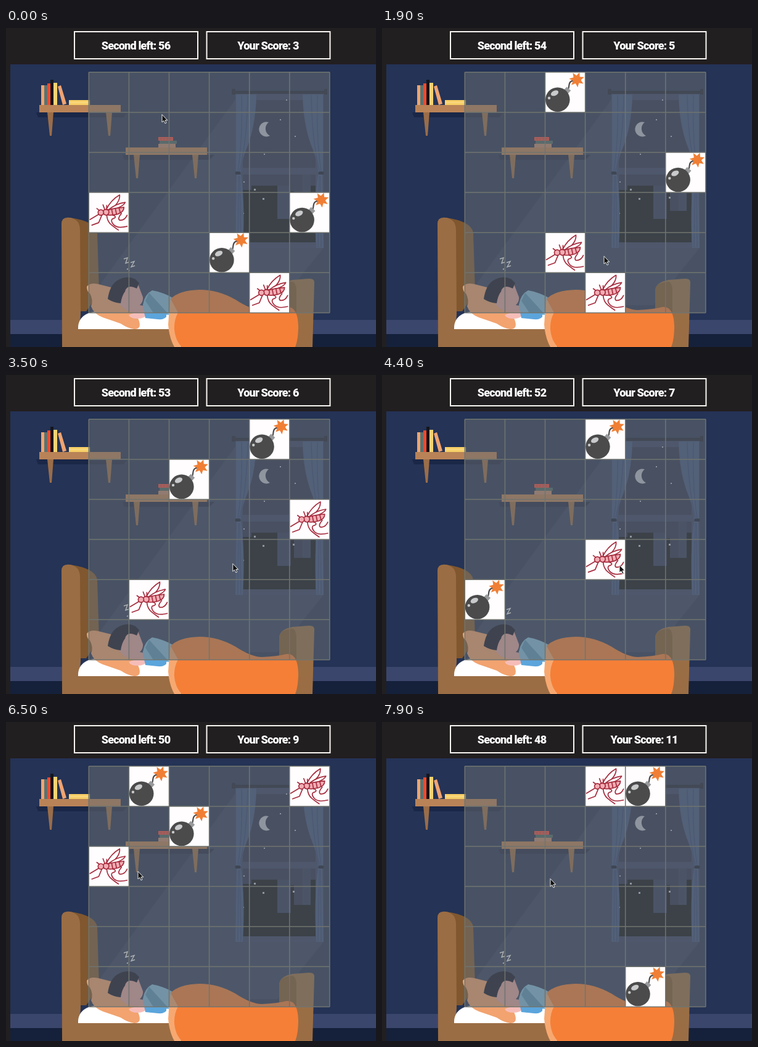
Animation of 600 by 518 pixels, one loop 8000 ms. Source, as an HTML page:

```html
<!DOCTYPE html>
<html lang="en">
<head>
<meta charset="utf-8">
<title>Mosquito game</title>
<style>
  html, body { margin: 0; width: 100%; height: 100%; overflow: hidden; background: #221f20; }
  svg { display: block; width: 100vw; height: 100vh; }
  text { font: 900 18px Roboto, sans-serif; letter-spacing: -.8px; fill: #fff; text-anchor: middle; }
</style>
</head>
<body>
<svg viewBox="0 0 600 518">
  <defs>
    <g id="mosquito">
      <rect width="65.1" height="65.1" fill="#fffdfe"/>
      <g fill="none" stroke="#a62c3e" stroke-width="1.7" stroke-linecap="round" stroke-linejoin="round">
        <path d="M17 35L2 44M21 37L16 49L5 53M29 37Q30 47 36 52T48 61M38 36Q48 40 38 43Q35 46 40 52Q46 59 62 55M53 34Q46 42 50 45Q58 46 62 37"/>
        <path d="M28 28Q36 12 50 4Q51 16 35 28Z" fill="#fff"/>
        <path d="M32 28Q44 18 59 16Q57 22 38 29Z" fill="#fff"/>
        <path d="M28 29Q42 25 57 24Q57 32 47 35Q36 38 28 36Z" fill="#f2adb4"/>
        <path d="M37 27L39 37M43 26L45 35.500M49 25L51 33"/>
        <path d="M23 30Q27 25 32 29Q34 35 29 37Q23 37 23 30Z" fill="#f2adb4"/>
        <circle cx="19.500" cy="32.500" r="4.500" fill="#f2adb4"/>
        <path d="M26 28L23 20M29 28L29 21M17 29L13 26"/>
      </g>
    </g>
    <g id="bomb">
      <rect width="65.1" height="65.1" fill="#fffdfe"/>
      <path d="M37 28C40 25 37 18 42 15S47 16 50 11" fill="none" stroke="#4b4b4d" stroke-width="2.2"/>
      <path d="M55.800 .5L56.200 7.500L63.300 7.900L58 12.800L62 18.800L54.900 17.500L52.800 24.400L49.300 18.100L42.500 20.700L45.400 14.100L39 10.500L46 8.500L45 1.300L50.800 5.500Z" fill="#f07f35"/>
      <rect x="-4.500" y="-5" width="9" height="10" fill="#98999b" transform="translate(35 30.500) rotate(42)"/>
      <circle cx="20.3" cy="44.500" r="19.8" fill="#4b4b4c"/>
      <ellipse cx="15.500" cy="34" rx="6.500" ry="4" fill="#c9cacb" transform="rotate(-25 15.500 34)"/>
      <circle cx="6.500" cy="42" r="2.2" fill="#c9cacb"/>
    </g>
    <g id="bracket">
      <path d="M-5 12H144L136 20H-2Z" fill="#1b2747"/>
      <path d="M13 12h10l-3 38h-3ZM108 12h10l-3 38h-3Z" fill="#9a6d49"/>
      <path d="M0 0H132V12H0Z" fill="#b98357"/>
    </g>
    <g id="curtain">
      <path d="M373 108H406Q405 160 390 196Q381 218 381 235H373Z" fill="#3a5081"/>
      <path d="M374 238H381Q388 285 384 357H372Z" fill="#3a5081"/>
      <path d="M382 109Q384 180 376 233M392 109Q391 180 379 232M377 240L376 356M379 240L381 356" fill="none" stroke="#2f4373" stroke-width="1.500"/>
      <rect x="371.500" y="233" width="9" height="5" rx="2" fill="#111c34"/>
    </g>
  </defs>

  <rect width="600" height="518" fill="#221f20"/>
  <g fill="none" stroke="#f8f5f2" stroke-width="2">
    <path d="M111 6H311V50H111ZM325.500 6H525.500V50H325.500Z"/>
  </g>
  <text id="clock" x="210.500" y="35"></text>
  <text id="score" x="425" y="35"></text>

  <path d="M7 59H600V518H7Z" fill="#243356"/>
  <path d="M7 474H600V498H7Z" fill="#3b466c"/>
  <path d="M7 497H600V518H7Z" fill="#15213a"/>
  <path d="M372 116L515 357L440 450H128Z" fill="#fff" opacity=".05"/>

  <use href="#bracket" x="54" y="125"/>
  <path d="M57 93h5v32h-5Z" fill="#f0a471"/>
  <path d="M62 93h5v32h-5Z" fill="#5d716f"/>
  <path d="M67 90h5v35h-5Z" fill="#ef4a2f"/>
  <path d="M72 84h5v41h-5Z" fill="#15161b"/>
  <path d="M77 89h6v36h-6Z" fill="#f6d272"/>
  <path d="M84 95L89 93L98 123L92 125Z" fill="#f0a471"/>
  <path d="M102 117h34v8h-34Z" fill="#f8cf66"/>
  <path d="M102 121h34" stroke="#fbe09a"/>

  <use href="#bracket" x="194" y="194"/>
  <path d="M247 177h24v6h-24Z" fill="#ef4a40"/>
  <path d="M249 183h28v5h-28Z" fill="#4b6966"/>
  <path d="M247 188h28v6h-28Z" fill="#c18b70"/>
  <path d="M250 180h18" stroke="#a84241" stroke-dasharray="3 2"/>

  <path d="M372 106H515V357H372Z" fill="#303e64"/>
  <path d="M384 117H502V227H384ZM384 238H502V348H384Z" fill="#262f4f"/>
  <path d="M384 348V263H398V256H440V310H462V265H467V297H481V265H494V256H502V348Z" fill="#0a1119"/>
  <path d="M440 256H460V310H440ZM481 238H494V297H481Z" fill="#2b375b"/>
  <path d="M426 153A12 12 0 1 0 428 175A13 13 0 0 1 426 153" fill="#b9c2d3"/>
  <path d="M454 116h2v2h-2ZM444 148h2v2h-2ZM468 175h2v2h-2ZM418 204h2v2h-2ZM385 249h2v2h-2ZM402 261h3v3h-3ZM416 276h3v3h-3ZM465 274h3v3h-3ZM384 300h2v2h-2Z" fill="#b9c2d3"/>
  <use href="#curtain"/>
  <use href="#curtain" transform="matrix(-1 0 0 1 887 0)"/>
  <path d="M366 99h6v3H516v-3h5v9h-5v-1H372v1h-6Z" fill="#1a2135"/>

  <path d="M443 518V426Q444 413 465 409L492 407Q500 407 500 413L497 518Z" fill="#9a6e45"/>
  <path d="M443 518V426Q444 414 463 412Q470 411 471 425V518Z" fill="#82592f"/>
  <path d="M104 308Q146 314 148 333L151 430L130 460H110Z" fill="#80572f"/>
  <path d="M91 518L90 318Q90 306 104 308Q120 311 120 328L121 465L119 489H496V518Z" fill="#9b6d44"/>
  <path d="M117 489Q116 470 134 463Q150 458 190 459H300V489Z" fill="#fff"/>
  <path d="M131 420Q136 413 150 416L170 421L226 460Q226 468 214 471Q222 489 208 489Q198 488 186 480Q172 475 157 470Q142 464 138 452Q142 442 136 431Q131 428 131 420Z" fill="#f2a36f"/>
  <path d="M199 466Q214 459 230 463Q226 472 213 472Q202 472 199 466Z" fill="#f6bdb8"/>
  <path d="M184 430Q193 412 214 416L222 437Q223 444 217 450L229 452L229 461L205 461Q190 459 183 446Z" fill="#dfa5a3"/>
  <path d="M165 440Q168 419 179 411Q195 400 210 408L216 414L212 423Q196 415 193 428Q188 434 186 447Q174 446 165 440Z" fill="#121429"/>
  <path d="M222 449Q225 432 237 426Q255 429 270 438L273 466H230Q221 461 222 449Z" fill="#7fbbdf"/>
  <path d="M232 430L263 464H240L226 443Z" fill="#5798bd"/>
  <path d="M224 462H260V469Q256 474 246 473L226 471Z" fill="#5ba5dc"/>
  <path d="M263 482Q264 461 267 439L284 436V518H273Q265 504 263 482Z" fill="#f7a871"/>
  <path d="M273 490Q272 475 279 462L267 440Q280 426 314 425Q344 425 372 441Q398 458 415 458Q440 457 455 453Q473 451 474 484Q474 506 469 518H285Q275 508 273 490Z" fill="#f57f37"/>
  <path d="M191 375L197 373L194 382L200 380M202 381L208 379L203 388L209 386M196 392l2-1M199 395l1-2" fill="none" stroke="#fff" stroke-width="1.400"/>

  <path d="M134 72H525V462H134Z" fill="#696e72" opacity=".53"/>
  <g id="pieces"></g>
  <path id="lines" fill="none" stroke="#70746f" stroke-width="1.500"/>
  <path id="cursor" d="M0 .5V13L2.800 10.500L5 15L7 14L5 9.800H8.800Z" fill="#111" stroke="#fff" stroke-width=".9"/>
</svg>
<script>
const LOOP = 8000, STEP = 100, CELL = 65.1, LEFT = 134.3, TOP = 71.8;
const $ = id => document.getElementById(id);

// Mosquitoes: column, row and, if swatted, the time. Bombs: column, row.
const rounds = [
  { mosquitoes: [[0, 3], [4, 5, 800]],  bombs: [[5, 3], [3, 4]] },
  { mosquitoes: [[0, 3], [4, 4, 1300]], bombs: [[1, 0], [5, 1]] },
  { mosquitoes: [[3, 5], [2, 4, 2500]], bombs: [[2, 0], [5, 2]] },
  { mosquitoes: [[5, 2], [1, 4]],       bombs: [[2, 1], [4, 0]] },
  { mosquitoes: [[4, 2, 4200], [3, 3, 4500]], bombs: [[3, 0], [0, 4]] },
  { mosquitoes: [[1, 3, 5400], [5, 4]], bombs: [[3, 0], [3, 5]] },
  { mosquitoes: [[0, 2, 6700], [5, 0]], bombs: [[1, 0], [2, 1]] },
  { mosquitoes: [[2, 2, 7400], [4, 3]], bombs: [[1, 1], [3, 4]] },
  { mosquitoes: [[3, 0]],               bombs: [[4, 0], [4, 5]] }
];
const swats = rounds.flatMap(r => r.mosquitoes.map(m => m[2])).filter(Boolean);

// Pointer stops: time, x, y
const stops = [
  [0, 253, 140], [700, 425, 425], [900, 425, 425], [1200, 422, 367], [1400, 422, 367],
  [2400, 298, 373], [2700, 298, 373], [3400, 365, 310], [4100, 415, 235], [4200, 415, 235],
  [4400, 385, 308], [4800, 385, 308], [5300, 260, 298], [5500, 258, 298], [6500, 214, 242],
  [6700, 185, 238], [6900, 185, 238], [7400, 270, 232], [7600, 272, 250], [7700, 272, 250], [7900, 273, 254]
];

let grid = "";
for (let i = 0; i <= 6; i++) {
  grid += `M${LEFT + i * CELL} ${TOP}v${6 * CELL}M${LEFT} ${TOP + i * CELL}h${6 * CELL}`;
}
$("lines").setAttribute("d", grid);

function pointerAt(t) {
  const next = stops.findIndex(s => s[0] > t);
  if (next < 0) return stops.at(-1).slice(1);
  const [t0, x0, y0] = stops[next - 1], [t1, x1, y1] = stops[next];
  const k = (t - t0) / (t1 - t0), ease = k * k * (3 - 2 * k);
  return [x0 + (x1 - x0) * ease, y0 + (y1 - y0) * ease];
}

const piece = kind => ([col, row]) =>
  `<use href="#${kind}" x="${LEFT + col * CELL}" y="${TOP + row * CELL}"/>`;

function draw(t) {
  const index = Math.floor((t + 100) / 1000), round = rounds[index];
  const alive = round.mosquitoes.filter(m => !m[2] || t < m[2]);
  $("clock").textContent = `Second left: ${56 - index}`;
  $("score").textContent = `Your Score: ${3 + swats.filter(s => s <= t).length}`;
  $("pieces").innerHTML = alive.map(piece("mosquito")).join("") + round.bombs.map(piece("bomb")).join("");
  $("cursor").setAttribute("transform", `translate(${pointerAt(t)})`);
}

let shown = -1;
function tick() {
  const t = Math.floor(performance.now() % LOOP / STEP) * STEP;
  if (t !== shown) draw(shown = t);
  requestAnimationFrame(tick);
}
tick();
</script>
</body>
</html>
```
